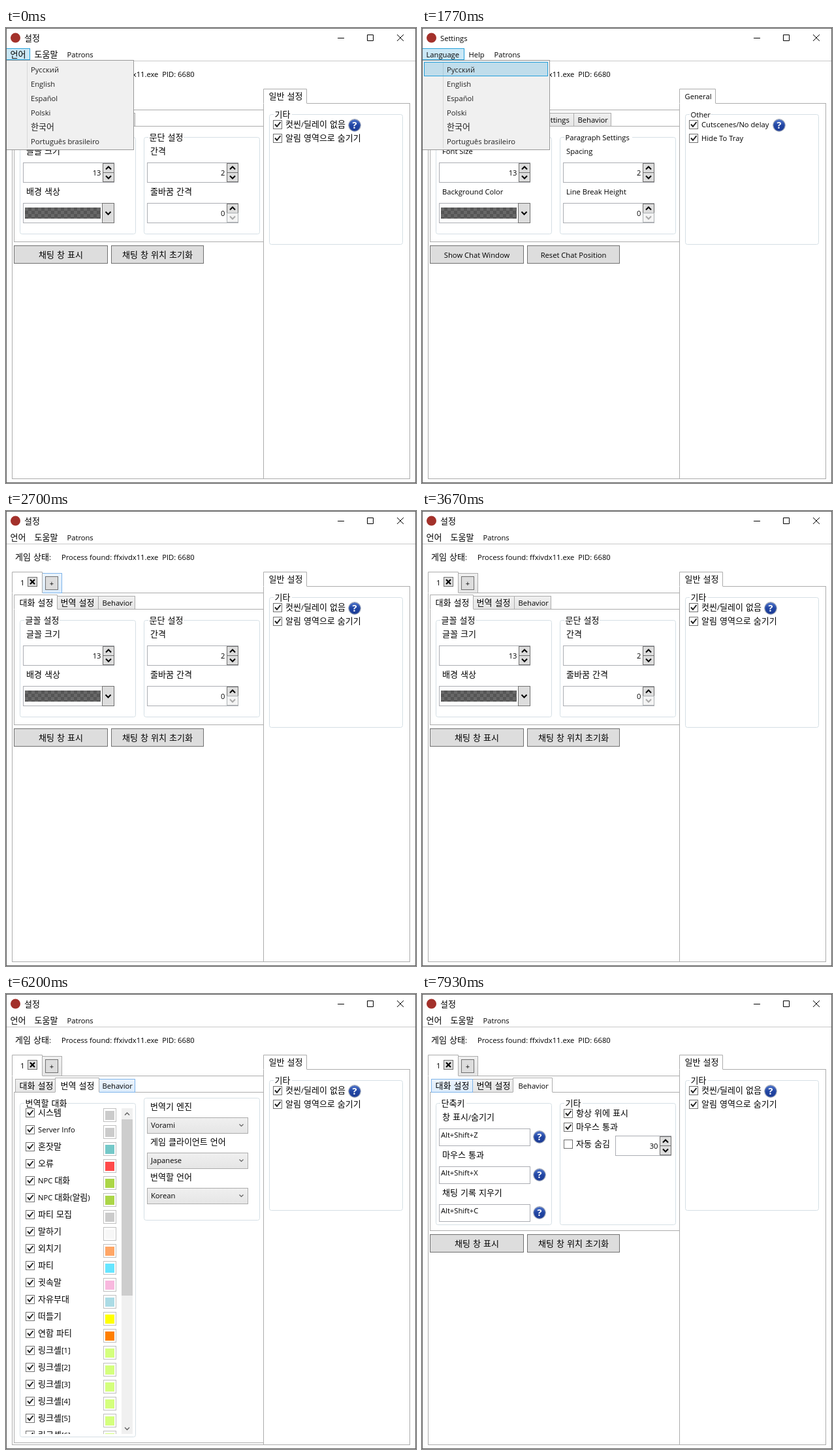
Animation of 628x697 px, one loop 8000 ms. Source, as an HTML page:

```html
<!DOCTYPE html>
<html lang="ko">
<head>
<meta charset="utf-8">
<title>Settings</title>
<style>
html, body { margin: 0; width: 100%; height: 100%; overflow: hidden; background: #fff; }
svg { display: block; width: 628px; height: 697px; }
text { font: 11.2px "Open Sans", "Noto Sans", sans-serif; white-space: pre; }
.k { font: 13px "Noto Sans CJK KR", "Noto Sans CJK", sans-serif; word-spacing: .4px; }
</style>
</head>
<body>
<svg id="stage" viewBox="0 0 628 697">
  <defs>
    <pattern id="checks" x="29" y="275" width="10" height="10" patternUnits="userSpaceOnUse">
      <path d="M0 0H10V10H0Z" fill="#555"/>
      <path d="M0 0H5V5H0ZM5 5H10V10H5Z" fill="#686868"/>
    </pattern>
    <linearGradient id="face" x2="0" y2="1"><stop stop-color="#f0f0f0"/><stop offset="1" stop-color="#e5e5e5"/></linearGradient>
    <linearGradient id="hot" x2="0" y2="1"><stop stop-color="#ecf4fc"/><stop offset="1" stop-color="#dcecfc"/></linearGradient>
    <linearGradient id="blue" x2="0" y2="1"><stop stop-color="#5277cc"/><stop offset=".5" stop-color="#2146a4"/><stop offset="1" stop-color="#1c3b94"/></linearGradient>
    <clipPath id="list"><path d="M21 175H198V674H21Z"/></clipPath>
  </defs>
  <g id="view"></g>
</svg>
<script>
const LOOP = 8000;
const view = document.getElementById('view');

const KO = {
  title: '설정', menu: ['언어', '도움말', 'Patrons'], menuX: [0, 37, 87, 140],
  status: '게임 상태:', tabs: ['대화 설정', '번역 설정', 'Behavior'], tabX: [14, 77, 141, 198],
  general: '일반 설정', generalEnd: 461, other: '기타', otherW: 28,
  skip: '컷씬/딜레이 없음', helpX: 534, tray: '알림 영역으로 숨기기',
  font: '글꼴 설정', fontW: 54, size: '글꼴 크기', color: '배경 색상',
  para: '문단 설정', paraW: 54, gap: '간격', line: '줄바꿈 간격',
  show: '채팅 창 표시', reset: '채팅 창 위치 초기화'
};
const EN = {
  title: 'Settings', menu: ['Language', 'Help', 'Patrons'], menuX: [0, 65, 104, 157],
  status: 'Game Status:', tabs: ['Dialogue Settings', 'Translation Settings', 'Behavior'], tabX: [14, 117, 232, 290],
  general: 'General', generalEnd: 450, other: 'Other', otherW: 33,
  skip: 'Cutscenes/No delay', helpX: 547, tray: 'Hide To Tray',
  font: 'Font Settings', fontW: 76, size: 'Font Size', color: 'Background Color',
  para: 'Paragraph Settings', paraW: 104, gap: 'Spacing', line: 'Line Break Height',
  show: 'Show Chat Window', reset: 'Reset Chat Position'
};
const LANGS = ['Русский', 'English', 'Español', 'Polski', '한국어', 'Português brasileiro'];
const CHANNELS = [
  ['시스템', '#cbcbcb'], ['Server Info', '#cbcbcb'], ['혼잣말', '#74c8c8'], ['오류', '#ff4a4a'],
  ['NPC 대화', '#abd647'], ['NPC 대화(알림)', '#abd647'], ['파티 모집', '#cbcbcb'], ['말하기', '#f7f7f7'],
  ['외치기', '#ffa666'], ['파티', '#66e5ff'], ['귓속말', '#f8b8de'], ['자유부대', '#abdbe5'],
  ['떠들기', '#ffff00'], ['연합 파티', '#ff7f00'],
  ...[1, 2, 3, 4, 5, 6].map(n => [`링크셸[${n}]`, '#d4ff7d'])
];

// Each step changes part of the state from its time on.
const STEPS = [
  [0, { s: KO, head: 0, popup: 'lang', item: -1, tab: 0, hotTab: -1, plusTab: false, plusBtn: false }],
  [600, { item: 0 }], [670, { item: 1 }],
  [930, { head: -1 }], [970, { s: EN, popup: '', item: -1 }], [1130, { head: 0 }],
  [1400, { popup: 'lang' }],
  [1770, { item: 0 }], [1830, { item: 1 }], [1930, { item: 2 }], [2030, { item: 3 }], [2170, { item: 4 }],
  [2500, { head: -1 }], [2530, { s: KO, popup: '', item: -1 }],
  [2700, { plusTab: true }], [2770, { plusTab: false }],
  [3030, { head: 1 }], [3200, { popup: 'help' }], [3630, { popup: '' }], [3670, { head: -1 }],
  [4370, { plusTab: true }], [4400, { plusBtn: true }],
  [5470, { plusBtn: false }], [5500, { plusTab: false, hotTab: 1 }],
  [5870, { tab: 1, hotTab: -1 }], [6200, { hotTab: 2 }],
  [7170, { tab: 2, hotTab: -1 }], [7930, { hotTab: 0 }]
];

const text = (x, y, str, anchor = 'start', fill = '#000') =>
  `<text x="${x}" y="${y}" text-anchor="${anchor}" fill="${fill}">` +
  str.split(/([가-힣]+(?: [가-힣]+)*)/).filter(Boolean)
    .map(p => /[가-힣]/.test(p) ? `<tspan class="k">${p}</tspan>` : p).join('') + '</text>';
const fillBox = (x, y, w, h, fill) => `<rect x="${x}" y="${y}" width="${w}" height="${h}" fill="${fill}"/>`;
// Crisp one pixel outline from pixel (x, y), w by h in all.
const box = (x, y, w, h, stroke, fill = '#fff', more = '') =>
  `<rect x="${x + .5}" y="${y + .5}" width="${w - 1}" height="${h - 1}" fill="${fill}" stroke="${stroke}" ${more}/>`;
const path = (d, stroke, width = 1, fill = 'none') =>
  `<path d="${d}" fill="${fill}" stroke="${stroke}" stroke-width="${width}"/>`;

const group = (x, y, w, h, title, titleW) =>
  box(x, y, w, h, '#d5dfe5', '#fff', 'rx="3"') +
  (title ? fillBox(x + 7, y - 2, titleW, 5, '#fff') + text(x + 8.5, y + 5, title) : '');

const check = (x, y, label, on = true) =>
  box(x, y, 14, 14, '#707070') +
  (on ? path(`M${x + 3} ${y + 6.5}L${x + 6} ${y + 10}L${x + 11.5} ${y + 3}`, '#212121', 2) : '') +
  text(x + 19, y + 11, label);

const help = (x, y) =>
  `<circle cx="${x}" cy="${y}" r="9.3" fill="url(#blue)" stroke="#a9b0be" stroke-width="1.2"/>` +
  `<text x="${x}" y="${y + 5.2}" text-anchor="middle" fill="#fff" style="font-size:14.5px;font-weight:700">?</text>`;

const button = (x, y, w, h, label) =>
  box(x, y, w, h, '#707070', '#ddd') + text(x + w / 2, y + 19, label, 'middle');

const arrow = (x, y, dir, color = '#000') =>
  path(`M${x - 4} ${y + 2 * dir}L${x} ${y - 2 * dir}L${x + 4} ${y + 2 * dir}`, color, 2);

function spinner(x, y, w, value, min = false) {
  const bx = x + w - 18;
  return box(x, y, w, 31, '#abadb3') + text(bx - 2.5, y + 20, value, 'end') +
    box(bx, y + 1, 18, 15, '#707070', '#ddd') + arrow(bx + 9, y + 8.5, 1) +
    box(bx, y + 15, 18, 15, min ? '#adb2b5' : '#707070', min ? '#f4f4f4' : '#ddd') +
    arrow(bx + 9, y + 22.5, -1, min ? '#a8a8a8' : '#000');
}

const combo = (y, label, value) =>
  text(221, y - 12, label) + box(216, y, 155, 25, '#acacac', 'url(#face)') + text(222, y + 16, value) +
  path(`M357.5 ${y + 10.5}L360.5 ${y + 13.5}L363.5 ${y + 10.5}`, '#606060', 1.2);

// A selected tab is open at its foot, so it joins the panel below.
const openTab = (x, y, end, foot) =>
  fillBox(x, y, end - x, foot - y + 1, '#fff') +
  path(`M${x + .5} ${foot + .5}V${y + .5}H${end - .5}V${foot + .5}`, '#acacac');

const tabBack = (x, y, w, h, hot) => box(x, y, w, h, hot ? '#7eb4ea' : '#acacac', hot ? 'url(#hot)' : 'url(#face)');

function frame(s) {
  return fillBox(0, 0, 628, 697, '#fff') +
    '<circle cx="14.5" cy="15" r="7.5" fill="#a3312b"/>' + text(28, 20, s.title) +
    path('M508 15.5H518M553.5 10.5H562.5V19.5H553.5ZM599 10L609 20M609 10L599 20', '#000') +
    path('M0 50.5H627', '#c9c9c9') +
    text(14, 75, s.status) + text(85, 75, 'Process found: ffxivdx11.exe  PID: 6680');
}

function menuBar({ s, head }) {
  const x = s.menuX;
  return (head < 0 ? '' : box(x[head], 31, x[head + 1] - x[head], 18, '#26a0da', '#cbe8f6')) +
    s.menu.map((m, i) => text(x[i] + 6.5, 45, m)).join('');
}

function popup({ popup, item }) {
  if (!popup) return '';
  const rows = popup === 'lang' ? LANGS : ['정보'];
  const h = rows.length * 22 + 6;
  return box(0, 49, popup === 'lang' ? 196 : 119, h, '#999', '#f0f0f0') +
    path(`M32.5 52V${h + 46}`, '#d7d7d7') +
    (item < 0 ? '' : box(3, 52 + 22 * item, 190, 22, '#26a0da', '#26a0da', 'fill-opacity=".24"')) +
    rows.map((r, i) => text(38, 68 + 22 * i, r, 'start', '#212121')).join('');
}

function rightPanel(s) {
  return box(394, 115, 225, 576, '#acacac') + openTab(394, 93, s.generalEnd, 115) + text(402.5, 109, s.general) +
    group(403, 132, 205, 200, s.other, s.otherW) +
    check(409, 141, s.skip) + check(409, 162, s.tray) + help(s.helpX, 149);
}

function outerTabs({ plusTab, plusBtn }) {
  return box(9, 125, 386, 566, '#acacac') + tabBack(55, 95, 31, 31, plusTab) +
    openTab(9, 93, 56, 125) + text(22, 114, '1') +
    box(33, 101, 15, 15, '#707070', '#ddd') + path('M37 105L44 112M44 105L37 112', '#000', 2.2) +
    box(60, 100, 20, 21, plusBtn ? '#3c7fb1' : '#707070', plusBtn ? '#bee6fd' : '#ddd') +
    text(70, 115, '+', 'middle');
}

function innerTabs({ s, tab, hotTab }, bottom) {
  const x = s.tabX;
  const backs = s.tabs.map((_, i) => i === tab ? '' : tabBack(x[i], 130, x[i + 1] - x[i] + (i < 2), 21, i === hotTab));
  if (hotTab >= 0) backs.push(backs[hotTab]);
  return box(12, 150, 383, bottom - 149, '#acacac') + backs.join('') +
    openTab(x[tab] - 2, 128, x[tab + 1] + 2, 150) +
    s.tabs.map((t, i) => text(x[i] + 6.5, 145, t)).join('');
}

const actions = (s, y) => button(12, y, 144, 28, s.show) + button(161, y, 142, 28, s.reset);

function dialoguePage(s) {
  return group(21, 167, 178, 149, s.font, s.fontW) + group(211, 167, 178, 149, s.para, s.paraW) +
    text(31, 193, s.size) + spinner(26, 206, 140, '13') +
    text(31, 255, s.color) + box(26, 268, 140, 31, '#abadb3') + fillBox(29, 275, 116, 17, 'url(#checks)') +
    box(147, 268, 19, 31, '#707070', '#ddd') + arrow(156.5, 283.5, -1) +
    text(221, 193, s.gap) + spinner(216, 206, 140, '2') +
    text(221, 255, s.line) + spinner(216, 268, 140, '0', true) + actions(s, 333);
}

function translationPage() {
  const rows = CHANNELS.map(([name, color], i) => {
    const y = 175 + 26 * i;
    return check(30, y, name) + box(149, y, 20, 21, '#c0c0c0') + fillBox(152, y + 4, 14, 14, color);
  });
  return group(21, 167, 178, 512, '번역할 대화', 66) + `<g clip-path="url(#list)">${rows.join('')}</g>` +
    fillBox(177, 175, 17, 499, '#f0f0f0') + fillBox(177, 192, 17, 270, '#cdcdcd') +
    path('M182 185.5L185.5 182L189 185.5M182 664L185.5 667.5L189 664', '#606060', 1.4) +
    group(211, 159, 178, 188) + combo(189, '번역기 엔진', 'Vorami') +
    combo(243, '게임 클라이언트 언어', 'Japanese') + combo(297, '번역할 언어', 'Korean');
}

function behaviorPage(s) {
  const keys = [['창 표시/숨기기', 'Z'], ['마우스 통과', 'X'], ['채팅 기록 지우기', 'C']];
  return group(21, 167, 178, 187, '단축키', 40) + group(211, 167, 178, 187, '기타', 28) +
    keys.map(([label, key], i) => {
      const y = 206 + 58 * i;
      return text(31, y - 13, label) + box(26, y, 140, 27, '#abadb3') +
        text(29, y + 14, 'Alt+Shift+' + key) + help(180, y + 13);
    }).join('') +
    check(217, 176, '항상 위에 표시') + check(217, 197, '마우스 통과') + check(217, 223, '자동 숨김', false) +
    spinner(296, 217, 86, '30') + actions(s, 368);
}

const PAGES = [[dialoguePage, 327], [translationPage, 687], [behaviorPage, 362]];

function draw(state) {
  const { s, tab } = state;
  const [page, bottom] = PAGES[tab];
  view.innerHTML = frame(s) + menuBar(state) + outerTabs(state) + innerTabs(state, bottom) + page(s) +
    rightPanel(s) + popup(state) + box(0, 0, 628, 697, '#5f5f5f', 'none');
}

let shown = -1;
function tick(now) {
  const t = now % LOOP;
  const step = STEPS.filter(([at]) => at <= t).length;
  if (step !== shown) {
    shown = step;
    draw(Object.assign({}, ...STEPS.slice(0, step).map(([, change]) => change)));
  }
  requestAnimationFrame(ahead);
}
let start;
function ahead(now) {
  start ??= now;
  tick(now - start);
}
tick(0);
</script>
</body>
</html>
```
